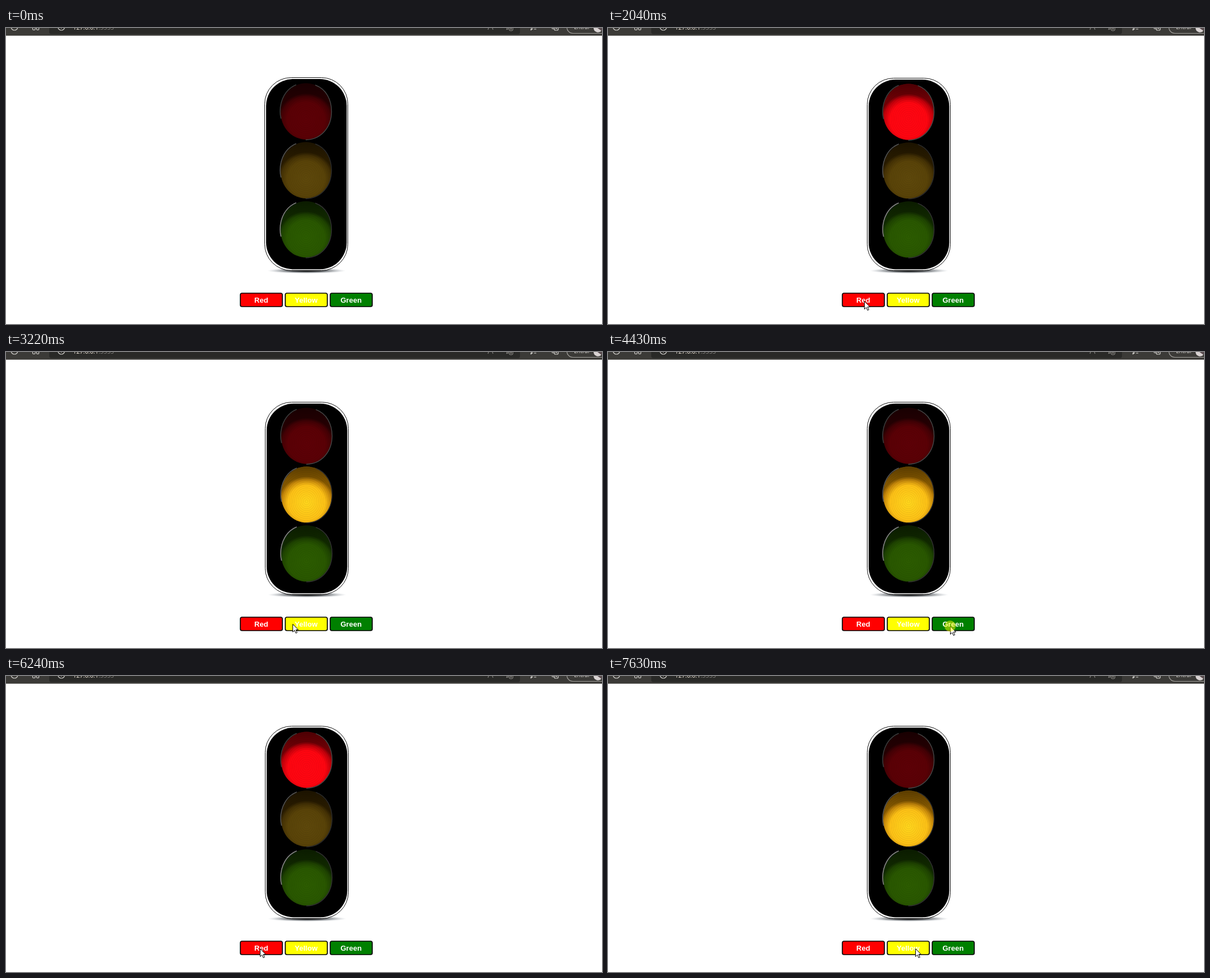
Recreate the animation shown at these times as an HTML page. Size 1061 by 528 pixels, loop 8 s.

```html
<!DOCTYPE html>
<html lang="en">
<head>
<meta charset="utf-8">
<title>Traffic light</title>
<style>
  html, body { margin: 0; width: 100%; height: 100%; overflow: hidden; background: #fff; }
  svg { display: block; position: absolute; left: 0; top: 0; }
  .ui { font-family: "Open Sans", "Noto Sans", sans-serif; }
  .btn { font: bold 13px "Liberation Sans", Arial, sans-serif; fill: #fff; text-anchor: middle; }
</style>
</head>
<body>
<svg width="1061" height="528" viewBox="0 0 1061 528">
  <defs>
    <linearGradient id="hood" x1="0" y1="0" x2="0" y2="1">
      <stop offset="0" stop-color="#000" stop-opacity=".3"/>
      <stop offset=".3" stop-color="#000" stop-opacity="0"/>
    </linearGradient>
    <radialGradient id="shadow">
      <stop offset="0" stop-color="#000"/>
      <stop offset=".45" stop-color="#23272b" stop-opacity=".75"/>
      <stop offset="1" stop-color="#8d98a3" stop-opacity="0"/>
    </radialGradient>
    <radialGradient id="rings" cx=".5" cy=".62" r=".035" spreadMethod="repeat">
      <stop offset=".5" stop-color="#000" stop-opacity="0"/>
      <stop offset=".8" stop-color="#000" stop-opacity=".07"/>
      <stop offset="1" stop-color="#000" stop-opacity="0"/>
    </radialGradient>
  </defs>

  <g class="ui" fill="none" stroke="#d8d6d2" stroke-width="1.2">
    <rect width="1061" height="13.700" fill="#3b3a37" stroke="none"/>
    <rect x="77" y="-20" width="838" height="31" rx="4" fill="#292927" stroke="none"/>
    <circle cx="15" cy="-2" r="6"/>
    <path d="M47.500-3V2q0 1.500 1.500 1.500h1.500q1.500 0 1.500-1.500V-3M54.500-3V2q0 1.500 1.500 1.500h1q1.500 0 1.500-1.500V-3"/>
    <circle cx="98.500" cy="-2" r="6"/>
    <path d="M98.500-4V1"/>
    <text x="119" y="2.500" font-size="10.800" stroke="none" fill="#f3e9dc">127.0.0.1<tspan fill="#8b8985">:5555</tspan></text>
    <g stroke="#85837f">
      <path d="M858 3l3-8M867 3l-3-8M891 3l2-5M891 3l4-2"/>
      <circle cx="899" cy="1.500" r="3.500"/>
      <path d="M897 1.500h4M899-.500v4"/>
    </g>
    <path d="M934 4l2-5M934 4l4-3M940-1h5M940 2h4M972-2V0q0 1.500 1.500 1.500H976M976-4V2q0 2 2 2h3q2 0 2-2V-4M977.500 0h4M979.500-2v4"/>
    <path d="M1061 9.500H1009A10.500 10.500 0 0 1 998.500-1" stroke="#a3a19d"/>
    <text x="1011" y="1.500" font-size="10" stroke="none" fill="#d8d6d2">Entrar</text>
    <g stroke="none">
      <circle cx="1054" cy="-1" r="8" fill="#5a4d50"/>
      <path d="M1046 0L1050-2L1060 5A8 8 0 0 1 1046 0Z" fill="#d9d3d3"/>
    </g>
  </g>

  <g id="signal"></g>
  <g id="buttons"></g>
  <path id="cursor" d="M.5 .5V14.500L3.800 11.500L6 16.600L8.300 15.600L6.100 10.600H10.300Z"
        fill="#fff" stroke="#000" stroke-linejoin="round"/>
  <circle id="press" r="10" fill="#ff0" fill-opacity=".48"/>
</svg>
<script>
const LOOP = 8000;
const $ = id => document.getElementById(id);

// core, glow, edge and top colours of each lens
const lamps = [
  { name: 'red', y: 98, left: '#3c3c3c', right: '#484848',
    off: ['#5d0006', '#5a0005', '#430004', '#240002'],
    on: ['#ff0612', '#ff0510', '#c0000a', '#700005'] },
  { name: 'yellow', y: 203, left: '#555', right: '#2c2c2c',
    off: ['#5e480b', '#594308', '#443104', '#281b00'],
    on: ['#ffd51c', '#fdc116', '#c4860a', '#835700'] },
  { name: 'green', y: 308.5, left: '#858585', right: '#333',
    off: ['#2c5c00', '#295700', '#1e4300', '#102800'],
    on: ['#7dff00', '#74fa00', '#50ba00', '#2b7000'] }
];
const lights = [[0, ''], [2040, 'red'], [3220, 'yellow'], [4570, 'green'], [6240, 'red'], [7630, 'yellow']];
const presses = [[1920, 2040], [3070, 3220], [4430, 4570], [6110, 6240], [7440, 7630]];

// first step, last step, step count, easing power, start, bend, end
const moves = [
  [980, 1250, 5, 1.5, [506, 530], [482, 511], [459, 492]],
  [1450, 1510, 2, 1, [459, 492], [457, 489], [456, 487]],
  [2430, 2870, 8, 1.5, [456, 487], [483, 505], [510, 485]],
  [3750, 4230, 8, 1.5, [510, 485], [560, 513], [609, 489]],
  [5230, 5900, 11, 1.94, [609, 489], [530.5, 532], [452, 486]],
  [6840, 7240, 8, 1.5, [452, 486], [500, 498], [547, 486]]
];

function gradient(id, colors) {
  const at = [0, 0.66, 0.88, 1];
  const stops = colors.map((c, i) => `<stop offset="${at[i]}" stop-color="${c}"/>`).join('');
  return `<radialGradient id="${id}" cx="0" cy="0" r="1"
    gradientTransform="translate(.5 .65) scale(.56 .47)">${stops}</radialGradient>`;
}

function lens({ name, y, left, right, off, on }) {
  const box = `x="489" y="${y + 0.5}" width="90" height="100.5" rx="45" ry="48"`;
  return `<defs>${gradient(name + 'Off', off)}${gradient(name + 'On', on)}</defs>
    <rect ${box} fill="url(#${name}Off)"/>
    <rect ${box} id="${name}" fill="url(#${name}On)"/>
    <rect ${box} fill="url(#rings)"/>
    <rect ${box} fill="url(#hood)"/>
    <g transform="translate(534 ${y})" fill="none" stroke-linecap="round">
      <path d="M-18 3.500C-36 11-46 30-46 51Q-46 57-44.500 63" stroke="${left}" stroke-width="1.600"/>
      <path d="M17 4C36 11 45.500 30 45.500 51C45.500 79 27 101 0 101.500" stroke="${right}" stroke-width="1.400"/>
    </g>`;
}

$('signal').innerHTML = `
  <ellipse cx="535" cy="433" rx="70" ry="5" fill="url(#shadow)"/>
  <rect x="460.5" y="88.500" width="148" height="344" rx="47" fill="#fff" stroke="#111"/>
  <rect x="463" y="91" width="143.500" height="339.500" rx="48"/>
  ` + lamps.map(lens).join('');

$('buttons').innerHTML = [['Red', 'red'], ['Yellow', '#ff0'], ['Green', 'green']].map(([label, fill], i) => `
  <rect x="${417.2 + 80 * i}" y="473" width="74.800" height="24" rx="3" fill="${fill}" stroke="#000" stroke-width="1.700"/>
  <text class="btn" x="${454.3 + 80 * i}" y="490">${label}</text>`).join('');

function cursorAt(t) {
  const move = moves.filter(m => t >= m[0]).pop();
  if (!move) return null;
  const [start, end, n, power, a, b, c] = move;
  const step = Math.min(n, 1 + Math.floor((t - start + 1) / ((end - start) / (n - 1))));
  const s = 1 - (1 - step / n) ** power;
  return a.map((v, i) => Math.round((1 - s) ** 2 * v + 2 * s * (1 - s) * b[i] + s * s * c[i]));
}

function show(id, visible) {
  $(id).setAttribute('visibility', visible ? 'visible' : 'hidden');
}

function draw(t) {
  const lit = lights.filter(l => t >= l[0]).pop()[1];
  lamps.forEach(l => show(l.name, l.name === lit));
  const dx = lit === 'red' || lit === 'yellow' ? 1 : 0;
  const scale = lit ? 0.9971 : 1;
  $('signal').setAttribute('transform', `translate(${dx} 433) scale(1 ${scale}) translate(0 -433)`);

  const pos = cursorAt(t);
  show('cursor', pos);
  show('press', pos && presses.some(([a, b]) => t >= a && t < b));
  if (pos) ['cursor', 'press'].forEach(id => $(id).setAttribute('transform', `translate(${pos})`));
}

const begin = performance.now();
function tick(now) {
  draw(Math.max(0, now - begin) % LOOP);
  requestAnimationFrame(tick);
}
draw(0);
requestAnimationFrame(tick);
</script>
</body>
</html>
```
